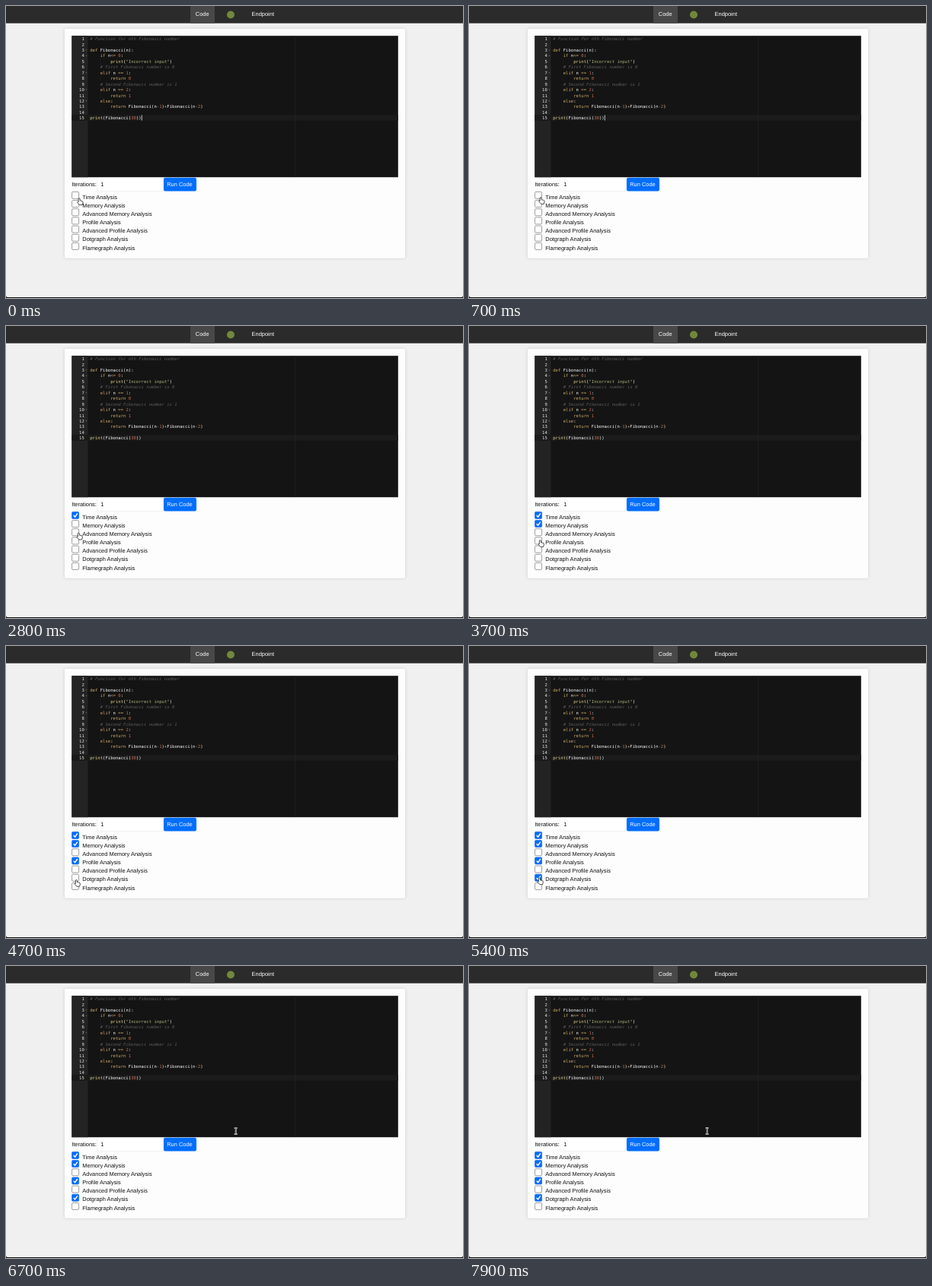
Write an HTML page that moves like this. It is 600 px wide and 384 px high and loops after 8 s.

```html
<!DOCTYPE html>
<html lang="en">
<head>
<meta charset="utf-8">
<title>Code analysis form</title>
<style>
html, body { margin: 0; width: 100%; height: 100%; overflow: hidden; background: #f0f0f0; }
svg { display: block; width: 600px; height: 384px; }
text { font: 7.44px "Liberation Sans", Arial, sans-serif; fill: #111; white-space: pre; text-rendering: geometricPrecision; }
.code text { font: 5.6px "DejaVu Sans Mono", monospace; fill: #f8f8f8; }
.code .num { fill: #e2e2e2; text-anchor: end; }
.code .comment { fill: #5f5a60; font-style: italic; }
.code .string { fill: #a9b07a; }
.code .keyword { fill: #cda869; }
.code .builtin { fill: #dad085; }
.code .number { fill: #cf6a4c; }
svg .light { fill: #fff; }
</style>
</head>
<body>
<svg viewBox="0 0 600 384">
  <defs>
    <filter id="shadow" x="-5%" y="-5%" width="110%" height="110%">
      <feDropShadow dx="0" dy="0" stdDeviation="2" flood-opacity=".14"/>
    </filter>
  </defs>
  <rect width="600" height="384" fill="#f0f0f0"/>
  <rect width="600" height="22.7" fill="#2b2b2b"/>
  <rect x="242" width="32" height="22.7" fill="#484848"/>
  <text class="light" x="248.8" y="13.4">Code</text>
  <circle cx="295" cy="11.5" r="5" fill="#71883c"/>
  <text class="light" x="322.6" y="13.4">Endpoint</text>

  <rect x="77" y="30" width="447" height="301.5" rx="2.5" fill="#fdfdfd" filter="url(#shadow)"/>
  <g class="code" id="editor">
    <rect x="86.4" y="39.2" width="428.4" height="186" fill="#141414"/>
    <rect x="86.4" y="39.2" width="21.2" height="186" fill="#232323"/>
    <rect x="107.6" y="143.3" width="407.2" height="7.4" fill="#1b1b1b"/>
    <rect x="86.4" y="143.3" width="21.2" height="7.4" fill="#1b1b1b"/>
    <rect x="379" y="39.2" width=".6" height="186" fill="#262626"/>
  </g>
  <rect id="caret" x="177.8" y="143.4" width=".9" height="7.2" fill="#d0d0d0"/>

  <text x="86.2" y="237.2">Iterations:</text>
  <rect x="119.8" y="225.9" width="86.4" height="17.6" rx="2" fill="#fff" stroke="#e8e8e8" stroke-width=".6"/>
  <text x="124.3" y="237.2">1</text>
  <rect id="button" x="207" y="225.8" width="43" height="17.8" rx="2"/>
  <text class="light" x="211.2" y="237.2">Run Code</text>
  <g id="options"></g>

  <path d="M0 384V381.5Q.5 383 2.5 383H597.5Q599.5 383 600 381.5V384Z" fill="#111"/>
  <g id="pointer" stroke-linejoin="round">
    <path id="hand" fill="#fff" stroke="#222" stroke-width=".8"
      d="M-1.2.3Q-.3-.8.7.3L1 3 3 3.3 4.4 4 4.8 5.4 4 8.6H.2L-2.5 5.5Q-2.6 4.1-1.2 4.6Z"/>
    <path id="arrow" fill="#111" stroke="#fff" stroke-width=".6" d="M0 0V8L1.9 6.3 3.2 9 4.4 8.4 3.2 5.8H5.6Z"/>
    <g id="beam" fill="none">
      <path stroke="#eee" stroke-width="1.7" d="M-2-4H-.8L0-3.4.8-4H2M-2 4H-.8L0 3.4.8 4H2M0-3.4V3.4"/>
      <path stroke="#333" stroke-width=".6" d="M-2-4H-.8L0-3.4.8-4H2M-2 4H-.8L0 3.4.8 4H2M0-3.4V3.4"/>
    </g>
  </g>
</svg>
<script>
const $ = id => document.getElementById(id);
const LOOP = 8000, STEP = 100, CHAR = 3.371, LINE = 7.43;

function add(parent, tag, attrs, text = '') {
  const node = document.createElementNS('http://www.w3.org/2000/svg', tag);
  for (const key in attrs) node.setAttribute(key, attrs[key]);
  node.textContent = text;
  parent.append(node);
  return node;
}

const code = `# Function for nth Fibonacci number

def Fibonacci(n):
    if n<= 0:
        print("Incorrect input")
    # First Fibonacci number is 0
    elif n == 1:
        return 0
    # Second Fibonacci number is 1
    elif n == 2:
        return 1
    else:
        return Fibonacci(n-1)+Fibonacci(n-2)

print(Fibonacci(30))`.split('\n');

const rules = /(?<comment>#.*)|(?<string>".*?")|(?<keyword>\b(?:def|if|elif|else|return)\b|[<=+-]+)|(?<builtin>\bprint\b)|(?<number>\d+)|(?<plain>[\w]+|[^\w\s])/g;

code.forEach((line, i) => {
  const y = 45.2 + i * LINE;
  add($('editor'), 'text', { class: 'num', x: 102.8, y }, i + 1);
  if (/:$/.test(line)) add($('editor'), 'path', { d: `M104.4 ${y - 2.6}h2l-1 1.4z`, fill: '#777' });
  if (/^ {8}/.test(line)) {
    add($('editor'), 'path', { d: `M123.8 ${y - 5.4}v${LINE}`, stroke: '#3a3a3a', 'stroke-width': .5, 'stroke-dasharray': '.5 .5' });
  }
  for (const m of line.matchAll(rules)) {
    const kind = Object.keys(m.groups).find(k => m.groups[k]);
    add($('editor'), 'text', { class: kind, x: 110.2 + m.index * CHAR, y }, m[0]);
  }
});

// Each option: label and the time it gets ticked
const options = [
  ['Time Analysis', 2000], ['Memory Analysis', 3100], ['Advanced Memory Analysis'],
  ['Profile Analysis', 3900], ['Advanced Profile Analysis'], ['Dotgraph Analysis', 5300],
  ['Flamegraph Analysis']
].map(([label, at = Infinity], i) => {
  const y = 244.4 + i * 11.17, group = $('options');
  const box = add(group, 'rect', { x: 86.6, y, width: 9, height: 9, rx: 1.2, 'stroke-width': .7 });
  const tick = add(group, 'path', { d: `M88.7 ${y + 4.7}l1.9 2 3.2-4.6`, fill: 'none', stroke: '#fff', 'stroke-width': 1.4 });
  add(group, 'text', { x: 100.3, y: y + 9.1 }, label);
  return { box, tick, at };
});

// Pointer route: time, x, y
const route = [
  [0, 96.3, 253], [900, 94, 251.6], [1200, 93, 251.3], [2000, 93, 251.3], [2800, 95.6, 272.3],
  [3100, 93.4, 260.5], [3400, 93.4, 260.5], [3700, 93.6, 281.8], [3900, 93.2, 282], [4200, 93.2, 301],
  [4700, 92.6, 307.6], [4900, 92.6, 316], [5200, 92.6, 305], [5400, 92.6, 305],
  [5800, 225, 236], [6000, 238, 229], [6100, 242.8, 217.5], [6900, 312.6, 217]
];

function position(t) {
  const i = route.findIndex(p => p[0] > t);
  if (i < 0) return route.at(-1).slice(1);
  const [a, b] = [route[i - 1], route[i]];
  let k = (t - a[0]) / (b[0] - a[0]);
  k = k * k * (3 - 2 * k);
  return [1, 2].map(n => a[n] + (b[n] - a[n]) * k);
}

const clamp = v => Math.max(0, Math.min(1, v));
const mix = (a, b, k) => `rgb(${a.map((v, i) => v + (b[i] - v) * k)})`;

function draw(t) {
  const [x, y] = position(t);
  const onButton = x > 207 && x < 250 && y > 226 && y < 244;
  const shape = y < 226 ? 'beam' : x < 97 || onButton ? 'hand' : 'arrow';
  for (const id of ['hand', 'arrow', 'beam']) $(id).style.display = id === shape ? '' : 'none';
  $('pointer').setAttribute('transform', `translate(${x} ${y})`);

  for (const { box, tick, at } of options) {
    const on = t >= at;
    box.setAttribute('fill', on ? '#0a6cf5' : '#fff');
    box.setAttribute('stroke', on ? '#0a6cf5' : '#767676');
    tick.style.display = on ? '' : 'none';
  }

  const hover = clamp((t - 5700) / 150) * clamp((6250 - t) / 150);
  $('button').setAttribute('fill', mix([0, 110, 255], [10, 77, 176], hover));
  $('caret').style.display = t < 2000 && (t + 400) % 1000 < 500 ? '' : 'none';
}

function tick(now) {
  draw(Math.floor(now % LOOP / STEP) * STEP);
  requestAnimationFrame(tick);
}
// The blink phase is restarted by a key press just before the loop begins
$('caret').style.display = '';
requestAnimationFrame(tick);
</script>
</body>
</html>
```
